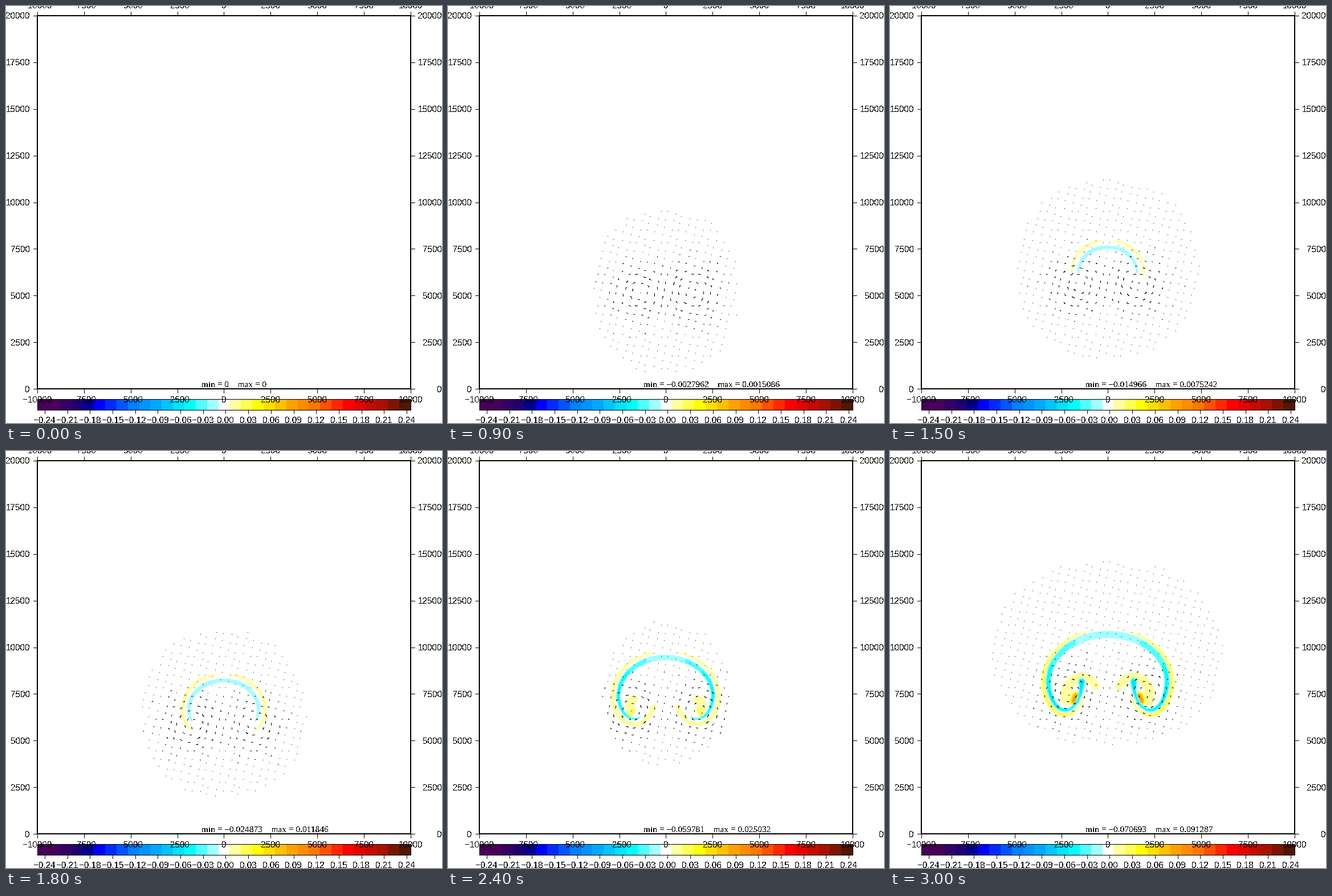
Animation of 765 by 732 pixels, one loop 3.3 s. Source, as a matplotlib script:

```python
import numpy as np
import matplotlib.pyplot as plt
from matplotlib.animation import FuncAnimation
from matplotlib.colors import LinearSegmentedColormap
from matplotlib.patches import Rectangle

W, H, DPI = 765, 732, 100
FRAMES, STEP = 11, 300
LEFT, RIGHT, TOP, BOTTOM = 55, 710, 17, 672
BAR_TOP, BAR_BOTTOM = 690, 709
MID = 382
PX = 72 / DPI
CELLS, WHITE, CELL_STEP = 33, 16, .01515

plt.rcParams["text.antialiased"] = False
plt.rcParams["text.hinting"] = "default"

EXTREMES = [
    ("0", "0"),
    ("−0.00024318", "0.00013127"),
    ("−0.00098254", "0.00053462"),
    ("−0.0027962", "0.0015086"),
    ("−0.0068413", "0.0036172"),
    ("−0.014966", "0.0075242"),
    ("−0.024873", "0.011846"),
    ("−0.03607", "0.016311"),
    ("−0.059781", "0.025032"),
    ("−0.069451", "0.05501"),
    ("−0.070693", "0.091287"),
]

# Colour keys by cell of the bar
KEYS = {0: "480058", 1: "480058", 3: "200070", 4: "000090", 5: "0000ff", 8: "0080ff",
        10: "00a8ff", 13: "00ffff", 15: "a0ffff", 16: "ffffff", 17: "ffffa0",
        19: "ffff00", 22: "ffa000", 24: "ff7800", 27: "ff0000", 30: "a81000",
        32: "501800"}
CMAP = LinearSegmentedColormap.from_list(
    "bar", [(i / (CELLS - 1), "#" + c) for i, c in KEYS.items()], N=1025)


def cell_color(cell):
    return CMAP(cell / (CELLS - 1))[:3]


def level_count(text, first):
    """Number of contour levels passed by the value in the caption."""
    value = float(text.lstrip("−"))
    return max(0, int(np.floor((value - first) / CELL_STEP)) + 1)


def mantle(k, offset, start, sweep):
    """Elliptic cap that goes over into a tightening curl; also its progress 0..1."""
    top, waist = 423 - 20.2 * k, 467 - 12.4 * k
    half, curl = 51 + 10.6 * k, 26 + k
    t = np.radians(np.linspace(start, 90 + sweep, 100))
    phi = np.maximum(t - np.pi / 2, 0)
    tight = 1 - .12 * phi / np.pi
    rx = np.where(phi > 0, (curl + offset) * tight, half + offset)
    ry = np.where(phi > 0, (28 + 5 * k + offset) * tight, waist - top + offset)
    cx = np.where(phi > 0, half - curl, 0)
    return cx + rx * np.sin(t), waist - ry * np.cos(t), np.linspace(0, 1, t.size)


def stroke(img, x, y, width, level):
    """Paint a round brush along the path and its mirror image."""
    y0, y1, reach = 300, 510, 130
    gy, gx = np.mgrid[y0:y1, 0:reach] + .5
    inside = np.zeros(gx.shape, bool)
    for px, py, w in zip(x, y, width):
        if w > 1:
            inside |= (gx - px) ** 2 + (gy - py) ** 2 < (w / 2) ** 2
    color = np.multiply(cell_color(WHITE + level), 255)
    img[y0:y1, MID:MID + reach][inside] = color
    img[y0:y1, MID - reach:MID][inside[:, ::-1]] = color


def paint_rim(img, k, hot):
    gap = 9 + 7 * max(0, k - 2)
    start = np.degrees(np.arcsin(gap / (51 + 10.6 * k)))
    x, y, s = mantle(k, 12 - .6 * k, start, min(10 + 50 * k, 155))
    blob = 9 * np.exp(-(k - 2.6) ** 2)
    width = 2 + (3 + .9 * k) * np.sin(np.pi * s ** .8) ** .7 + blob * s ** 6
    stroke(img, x, y, width, 1)
    if hot > 3:
        stroke(img, x, y, width - 5, 2)


def paint_roll(img, k, hot):
    """Hook above the vortex core and the hot spot inside it."""
    if k < 2:
        return
    r = 8 * (k - 1.5)
    t = np.radians(np.linspace(-20, 40 * (k - 1) - 10, 40))
    width = min(7 * k, 18) * (1 - .25 * np.linspace(0, 1, 40) ** 2)
    stroke(img, 60 - 3 * k + r * np.cos(t), 478 - 10 * k - 1.1 * r * np.sin(t), width, 1)
    x, y = 62.5 - 1.5 * k, 494 - 12 * k
    for j in range(2, hot + 1):
        d = 8 + 2.6 * (hot - j)
        stroke(img, np.linspace(x, x + 3, 6), np.linspace(y - 3, y + 4, 6), [d] * 6, j)


def paint_sheet(img, k, cold):
    x, y, s = mantle(k, 0, 0, 36 * k)
    head = 5 * max(0, k - 3)
    width = 3.5 + .3 * k * (1 - s) + (1.5 + 1.3 * k) * (1 - s) ** 2 \
        + 2.5 * np.sin(np.pi * s) + head * s ** 10
    for j in range(1, cold + 1):
        core = np.where(s >= .13 * (j - 1), width - 2.2 * (j - 1), 0)
        stroke(img, x, y, core, -j)


# Square lattice turned by atan(1/4), nodes shaken alike in every 17-node tile
I, J = np.mgrid[-30:31, -30:31]
SHAKE = np.random.default_rng(4).uniform(-2, 2, (2, 17))
TILE = (I + 4 * J) % 17
GRID_X = (372.5 + 13 * I - 3.25 * J + SHAKE[0][TILE]).ravel()
GRID_Y = (303.5 + 3.25 * I + 13 * J + SHAKE[1][TILE]).ravel()


def flow(x, y, n):
    """Velocity of a rising, slowly spreading vortex pair."""
    offset, vy, core = 36 + 3 * n, 510 - .85 * n ** 2, 24
    u, v = np.zeros_like(x), np.zeros_like(x)
    for side in (-1, 1):
        dx, dy = x - MID - side * offset, y - vy
        g = side * np.exp(-(dx ** 2 + dy ** 2) / (2 * core ** 2)) / (core * .607)
        u -= dy * g
        v += dx * g
    return u, v


def paint_vectors(img, n):
    cy = np.interp(n, [3, 5, 7, 10], [501, 461, 461, 355])
    rx = np.interp(n, [1, 5, 8, 10], [97, 162, 112, 204])
    ry = np.interp(n, [1, 3, 5, 8, 10], [90, 146, 158, 127, 163])
    near = np.abs((GRID_X - MID) / rx) ** 2.2 + np.abs((GRID_Y - cy) / ry) ** 2.2 <= 1
    x, y = GRID_X[near], GRID_Y[near]
    u, v = flow(x, y, n)
    for s in np.linspace(-2, 2, 11):
        img[(y + s * v).astype(int), (x + s * u).astype(int)] = 0


def picture(n):
    img = np.full((H, W, 3), 255, np.uint8)
    cold = level_count(EXTREMES[n][0], .0104)
    hot = level_count(EXTREMES[n][1], .0046)
    k = n - 5
    if hot:
        paint_roll(img, k, hot)
        paint_rim(img, k, hot)
        paint_sheet(img, k, cold)
    if n:
        paint_vectors(img, n)
    return img


fig = plt.figure(figsize=(W / DPI, H / DPI), dpi=DPI, facecolor="white")
ax = fig.add_axes([0, 0, 1, 1])
ax.axis("off")
field = ax.imshow(picture(0), extent=(0, W, H, 0), interpolation="nearest", aspect="auto")
ax.set_xlim(0, W)
ax.set_ylim(H, 0)


def label(x, y, s, ha="center", font="Liberation Sans", size=15.2):
    return ax.text(x, y, s, ha=ha, va="baseline", family=font, size=size * PX,
                   color="black", zorder=6)


def line(x, y):
    ax.plot(x, y, color="black", lw=PX, solid_capstyle="butt", antialiased=False, zorder=5)


def box(x0, y0, x1, y1, width, **fill):
    style = fill or dict(fc="none", ec="black", zorder=5)
    ax.add_patch(Rectangle((x0, y0), x1 - x0, y1 - y0, lw=width * PX,
                           antialiased=False, **style))


def number(v, fmt="{:.0f}"):
    return fmt.format(v).replace("-", "−")


# Colour bar
edges = np.linspace(LEFT, RIGHT, CELLS + 1)
for k in range(CELLS):
    box(edges[k], BAR_TOP, edges[k + 1], BAR_BOTTOM, 0, fc=cell_color(k), ec="none", zorder=3)
box(LEFT, BAR_TOP, RIGHT, BAR_BOTTOM, 1)
for k in range(-8, 9):
    x = 385.5 + 39.68 * k
    line([x, x], [BAR_BOTTOM, BAR_BOTTOM + 6])
    label(x, 732, number(k * .03, "{:.2f}"))

# Axes
box(LEFT, TOP, RIGHT, BOTTOM, 2)
for k in range(9):
    x = LEFT + (RIGHT - LEFT) * k / 8
    y = BOTTOM - (BOTTOM - TOP) * k / 8
    line([x, x], [TOP - 7, TOP])
    line([x, x], [BOTTOM, BOTTOM + 7])
    line([LEFT - 7, LEFT], [y, y])
    line([RIGHT, RIGHT + 7], [y, y])
    for base in (4, 696):
        label(x, base, number(-10000 + 2500 * k))
    for edge in (42, 765):
        label(edge, y + 5.5, number(2500 * k), ha="right")

caption = label(343, 669, "", "left", "Liberation Serif", 15.4)


def update(n):
    field.set_data(picture(n))
    caption.set_text("min = {}    max = {}".format(*EXTREMES[n]))
    return field, caption


anim = FuncAnimation(fig, update, frames=FRAMES, interval=STEP, repeat=True,
                     repeat_delay=0, blit=False)
plt.show()
```
